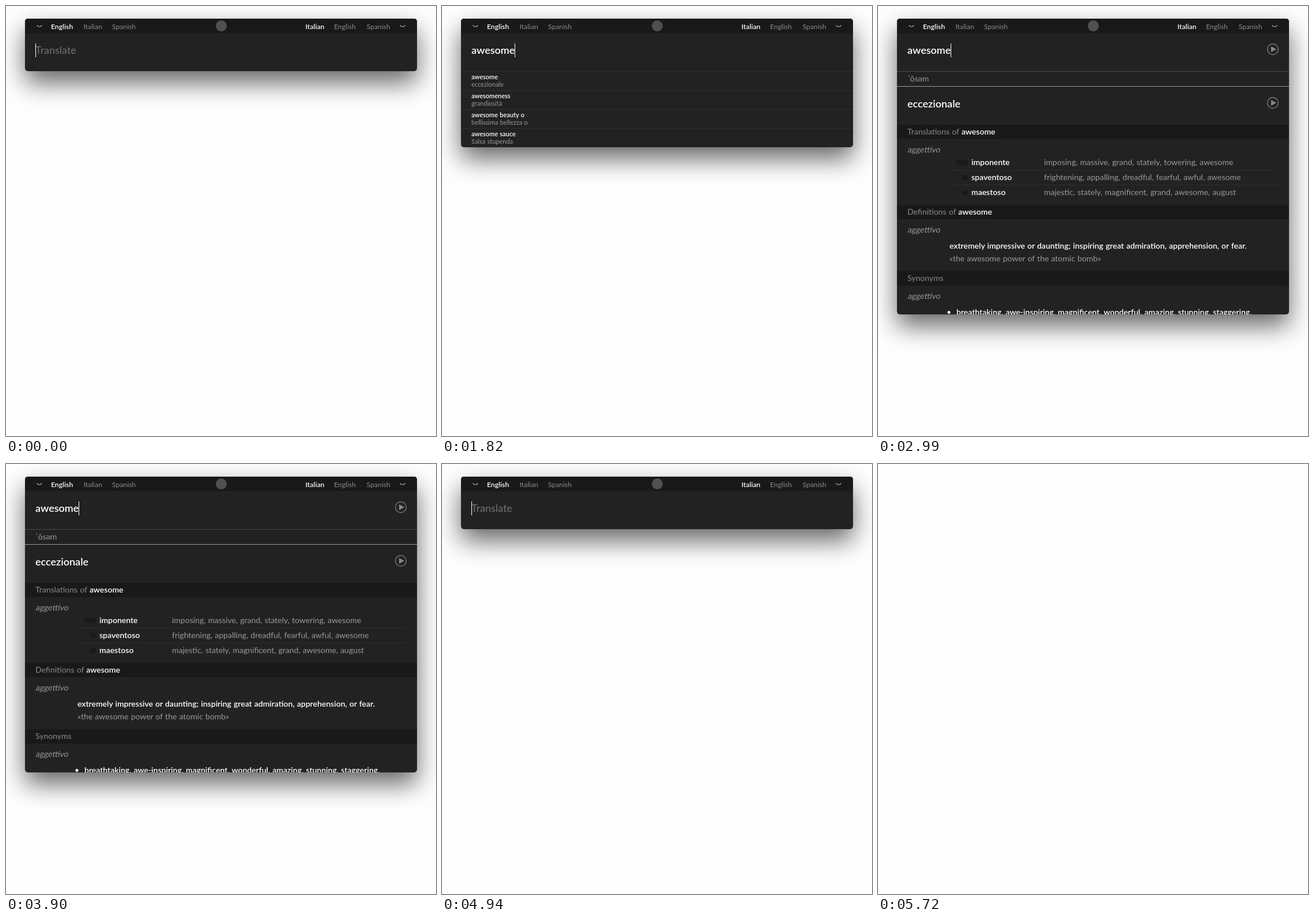
An HTML page that plays this animation: 746x746 px, repeating every 6.89 s.

```html
<!DOCTYPE html>
<html lang="en">
<head>
<meta charset="utf-8">
<title>Translate panel</title>
<style>
html, body { margin: 0; width: 100%; height: 100%; overflow: hidden; background: #fefefe; }
#shadow { position: absolute; left: 33px; top: 22px; width: 680px; border-radius: 5px;
  box-shadow: 0 20px 44px rgba(0,0,0,.6), 0 0 1px rgba(0,0,0,.6); }
svg { position: absolute; left: 0; top: 0; }
text { font: 14px Lato, "Open Sans", sans-serif; fill: #999; word-spacing: .04em; white-space: pre; }
.small { font-size: 11px; }
.menu { font-size: 12.2px; }
.big { font-size: 18px; }
.dim { fill: #8a8a8a; }
.hint { fill: #737373; }
.bold { font-weight: 600; fill: #fff; }
</style>
</head>
<body>
<div id="shadow"></div>
<svg id="panel" width="746" height="746">
  <rect width="746" height="746" fill="#222"/>
  <rect y="22" width="746" height="25" fill="#191919"/>
  <circle cx="373.5" cy="34.5" r="9.5" fill="#505050"/>
  <path d="M53.5 33.5Q58 38.5 62.5 33.5M683.5 33.5Q688 38.5 692.5 33.5" fill="none" stroke="#aaa" stroke-width="1.2"/>
  <g id="menu"></g>
  <text id="query" class="big" x="51" y="83"></text>
  <rect id="caret" y="65" width="1" height="24" fill="#fff"/>
  <g id="list"></g>
  <g id="result"></g>
  <g id="play"></g>
</svg>
<script>
const $ = id => document.getElementById(id);
const text = (x, y, s, cls = '') => `<text x="${x}" y="${y}" class="${cls}">${s}</text>`;
const bar = (x, y, w, h, fill) => `<rect x="${x}" y="${y}" width="${w}" height="${h}" fill="${fill}"/>`;
const playButton = y => `<g transform="translate(685 ${y})" fill="#888">
  <circle r="9.4" fill="none" stroke="#888" stroke-width="1.2"/><path d="M-3-5L6 0L-3 5Z"/></g>`;
const section = (y, label, word = '') => bar(33, y, 680, 25, '#191919') +
  text(51, y + 17, `${label}<tspan class="bold">${word}</tspan>`, 'dim') +
  `<g transform="translate(51 ${y + 48}) skewX(-11)">${text(0, 0, 'aggettivo')}</g>`;

$('menu').innerHTML = [[78, 'English'], [134.5, 'Italian'], [184, 'Spanish'],
  [519.5, 'Italian'], [569, 'English'], [625.5, 'Spanish']]
  .map(([x, s], i) => text(x, 40, s, i % 3 ? 'menu dim' : 'menu bold')).join('');

$('list').innerHTML = [['awesome', 'eccezionale'], ['awesomeness', 'grandiosità'],
  ['awesome beauty o', 'bellissima bellezza o'], ['awesome sauce', 'Salsa stupenda']]
  .map(([word, meaning], i) => {
    const y = 113 + 33 * i;
    return bar(33, y, 680, 1, '#303030') +
      `<g class="item">${text(51, y + 14, word, 'small bold')}${text(51, y + 27, meaning, 'small')}</g>`;
  }).join('');

const meanings = [
  ['imponente', 'imposing, massive, grand, stately, towering, awesome', 20],
  ['spaventoso', 'frightening, appalling, dreadful, fearful, awful, awesome', 10],
  ['maestoso', 'majestic, stately, magnificent, grand, awesome, august', 10]
];
$('result').innerHTML =
  bar(33, 113, 680, 1, '#4a4a4a') + text(52, 131, 'ˈôsəm') + bar(33, 139, 680, 1, '#999') +
  text(51, 176, 'eccezionale', 'big bold') + playButton(168) +
  section(206, 'Translations of ', 'awesome') +
  meanings.map(([word, list, w], i) => {
    const y = 276 + 26 * i;
    return bar(156 - w, y - 9, w, 9, '#1a1a1a') + text(162, y, word, 'bold') + text(288, y, list) +
      (i < 2 ? bar(121, y + 8, 574, 1, '#2d2d2d') : '');
  }).join('') +
  section(345, 'Definitions of ', 'awesome') +
  text(124, 421, 'extremely impressive or daunting; inspiring great admiration, apprehension, or fear.', 'bold') +
  text(124, 443, '«the awesome power of the atomic bomb»') +
  section(460, 'Synonyms') +
  '<circle cx="123" cy="531.5" r="2.5" fill="#fff"/>' +
  text(136, 536, 'breathtaking, awe-inspiring, magnificent, wonderful, amazing, stunning, staggering,', 'bold');
$('play').innerHTML = playButton(75);

const items = document.querySelectorAll('.item');
const show = (el, on) => el.style.display = on ? '' : 'none';
const within = (t, a, b) => t >= a && t < b;

function draw(t) {
  const typed = within(t, 910, 4680) ? 'awesome'.slice(0, Math.floor((t - 910) / 130) + 1) : '';
  const listed = within(t, 1170, 2990), found = within(t, 2340, 4940);
  const base = listed ? 245 : 113;
  const bottom = found ? base + 422 : base;

  for (const id of ['panel', 'shadow']) show($(id), t < 5720);
  $('panel').style.clipPath = `inset(22px 33px ${746 - bottom}px 33px round 5px)`;
  // The shadow catches up only after the results have settled.
  $('shadow').style.height = (found && listed ? base : bottom) - 22 + 'px';

  const query = $('query');
  query.textContent = typed || 'Translate';
  query.setAttribute('class', typed ? 'big bold' : 'big hint');
  const width = typed ? query.getComputedTextLength() : 0;
  $('caret').setAttribute('x', 51 + Math.round(width));
  show($('caret'), [[0, 520], [910, 2340], [2990, 3510], [3900, 4420], [4940, 5460]]
    .some(([a, b]) => within(t, a, b)));

  show($('list'), listed);
  items.forEach((item, i) => show(item, i < 2 || t >= 1820));
  show($('result'), found);
  $('result').setAttribute('transform', `translate(0 ${base - 113})`);
  show($('play'), found);
}

function tick() {
  draw(performance.now() % 6890);
  requestAnimationFrame(tick);
}
tick();
</script>
</body>
</html>
```
